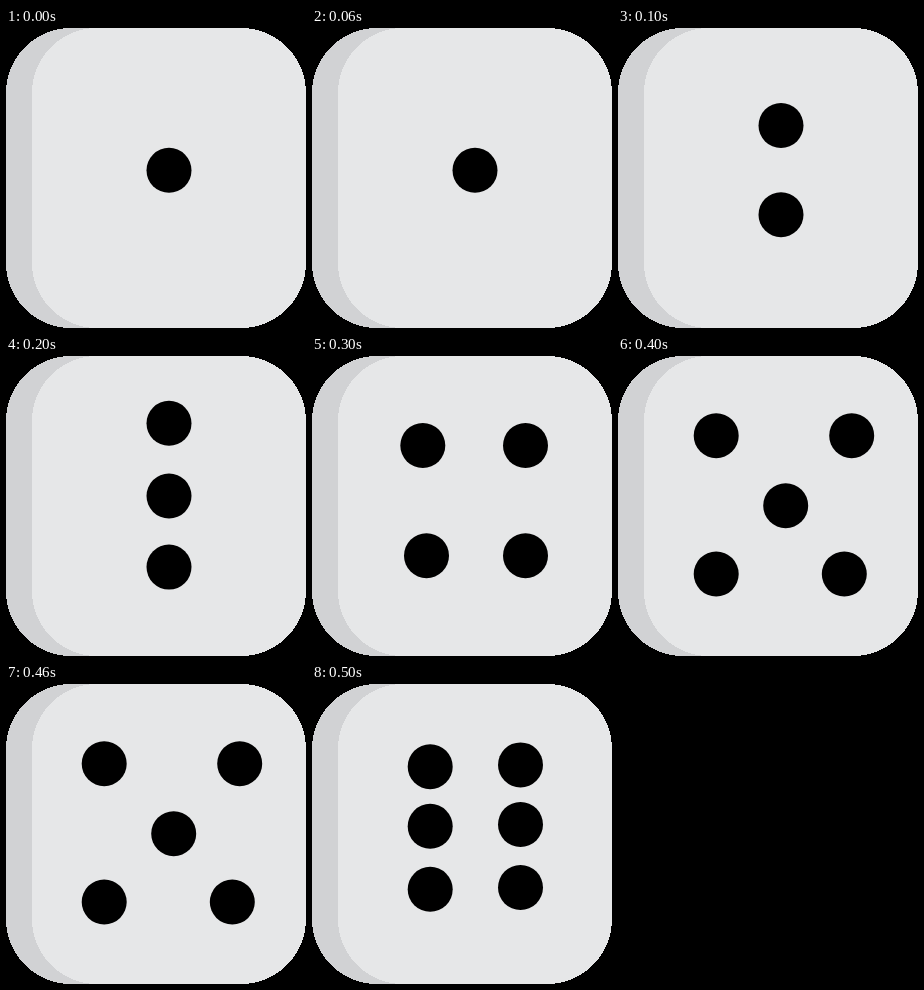
Animation, 300 px wide and 300 px high, one loop 0.6 s. Source, as an HTML page:

```html
<!DOCTYPE html>
<html lang="en">
<head>
<meta charset="utf-8">
<title>Die</title>
<style>
  html, body { margin: 0; width: 100%; height: 100%; overflow: hidden; background: #000; }
  svg { display: block; width: 100vw; height: 100vh; }
  rect { shape-rendering: crispEdges; }
</style>
</head>
<body>
<svg viewBox="0 0 300 300">
  <rect width="274" height="300" rx="65" fill="#d1d2d4"/>
  <rect x="26" width="274" height="300" rx="65" fill="#e6e7e8"/>
  <g id="pips"></g>
</svg>
<script>
  const STEP = 100;
  const RADIUS = 22.5;
  const MIDDLE = 163;

  const column = (...ys) => ys.map(y => [MIDDLE, y]);
  const row = (left, right, y, rise = 0) => [[left, y], [right, y - rise]];

  // Pip centres for each face, one to six
  const faces = [
    column(142.3),
    column(97.5, 186.7),
    column(67.3, 140, 211.1),
    [...row(110.8, 213.5, 89.5), ...row(114.5, 213.5, 199.7)],
    [...row(98.2, 233.7, 79.7), [167.7, 149.7], ...row(98.2, 226.3, 218)],
    [82.7, 142.3, 205.3].flatMap(y => row(118.2, 208.5, y, 1.8))
  ];

  const group = document.getElementById('pips');
  const pips = faces[5].map(() => {
    const pip = document.createElementNS('http://www.w3.org/2000/svg', 'circle');
    pip.setAttribute('r', RADIUS);
    return group.appendChild(pip);
  });

  function draw(time) {
    const face = faces[Math.floor(time / STEP) % faces.length];
    pips.forEach((pip, i) => {
      const spot = face[i];
      pip.setAttribute('visibility', spot ? 'visible' : 'hidden');
      if (!spot) return;
      pip.setAttribute('cx', spot[0]);
      pip.setAttribute('cy', spot[1]);
    });
  }

  const start = performance.now();
  function tick() {
    draw(performance.now() - start);
    requestAnimationFrame(tick);
  }
  tick();
</script>
</body>
</html>
```
